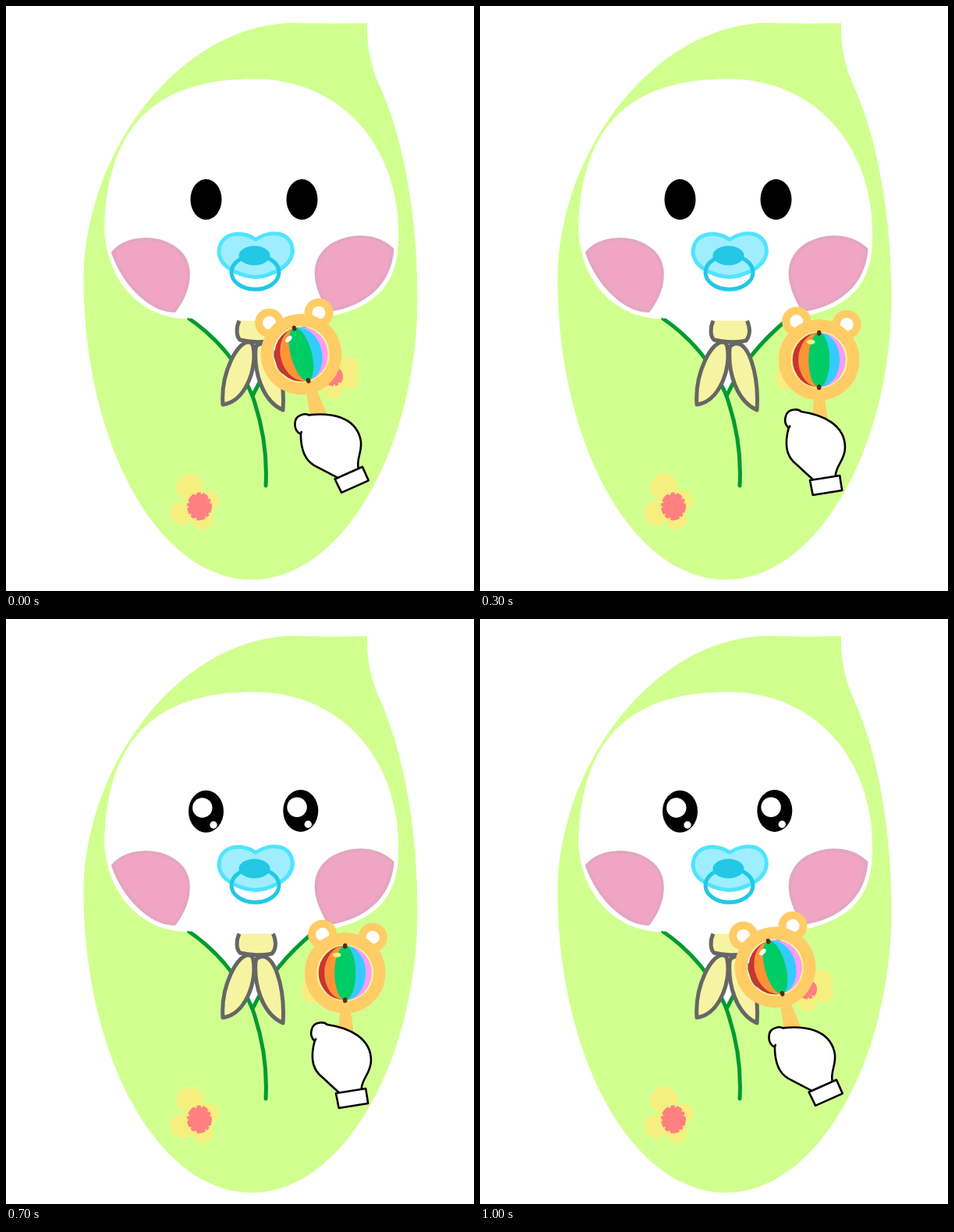
Write an HTML page that moves like this. It is 600 px wide and 750 px high and loops after 1450 ms.

```html
<!DOCTYPE html>
<html lang="en">
<head>
<meta charset="utf-8">
<title>Baby with a rattle</title>
<style>
html, body { margin: 0; width: 100%; height: 100%; overflow: hidden; background: #fff; }
svg { display: block; width: 100%; height: 100%; }
.scarf { fill: #f6f4a2; stroke: #666; stroke-width: 5; stroke-linejoin: round; }
.cheek { fill: #f0a5c4; stroke: #e3a6c0; stroke-width: 4; stroke-linejoin: round; }
.seam { fill: none; stroke: #009a33; stroke-width: 5; stroke-linecap: round; }
.hand { fill: #fff; stroke: #000; stroke-width: 2.6; stroke-linejoin: round; stroke-linecap: round; }
.petals { fill: #f4ef7e; }
.heart { fill: #ff8080; stroke: #ff8080; stroke-width: 4; stroke-dasharray: 8 2 4 2 11 3 5 2; }
.ear { fill: #fff; stroke: #fc6; stroke-width: 10; }
</style>
</head>
<body>
<svg viewBox="0 0 600 750">
  <path fill="#d1ff8f" d="M372 21.500Q400 23 463 22C462 50 468 78 478 100C510 170 527.500 270 527.500 375C527.500 560 435 735.500 315 735.500C195 735.500 99.500 560 99.500 350C99.500 190 222 21.500 372 21.500Z"/>

  <g class="petals">
    <circle cx="236" cy="617" r="17.5"/><circle cx="261" cy="634" r="12.5"/>
    <circle cx="226" cy="650" r="15.5"/><circle cx="252" cy="658" r="13.5"/>
    <circle cx="412" cy="448" r="16"/><circle cx="439" cy="463" r="13.5"/>
    <circle cx="441" cy="479" r="12"/><circle cx="393" cy="477" r="15"/>
    <circle cx="419" cy="490" r="13.5"/>
  </g>
  <ellipse class="heart" cx="248" cy="641.500" rx="14" ry="16"/>
  <ellipse class="heart" cx="420" cy="475" rx="10" ry="10.500"/>

  <path fill="#fff" d="M126 285C130 160 185 93.500 318 93.500C430 93.500 503 180 503 290C505 357 475 391 395 401C360 430 335 460 316 500C300 460 270 425 235 401C178 402 129 358 126 285Z"/>
  <path class="seam" d="M235 401C270 425 300 460 316 500C330 540 335 580 333 615M395 401C360 430 335 460 316 500"/>
  <path fill="#fff" d="M225 385H408L396 400.500H234Z"/>

  <path class="scarf" d="M311 431C297 430 275 470 278 511C307 507 322 465 317 437Q316 431 311 431Z"/>
  <path class="scarf" d="M324 434C344 424 358 474 355 518C328 506 318 468 320 440Q320 435 324 434Z"/>
  <path class="scarf" d="M299 403.500C295 412 295 423 300 428C312 431 330 432 341 429C347 422 346 412 342.500 403.500"/>

  <path class="cheek" d="M137 316C155 295 195 293 220 313C240 330 238 362 216 391C188 391 153 361 137 316Z"/>
  <path class="cheek" d="M495.500 312C475 293 445 292 420 305C393 322 390 350 414 390C457 384 492 358 495.500 312Z"/>

  <g id="plainEyes">
    <ellipse cx="256.500" cy="248" rx="20" ry="26"/>
    <ellipse cx="379.500" cy="248" rx="20" ry="26"/>
  </g>
  <g id="brightEyes">
    <g id="brightEye">
      <ellipse cx="256.500" cy="246.700" rx="22.500" ry="27"/>
      <circle cx="251.800" cy="242" r="12.700" fill="#fff"/>
      <circle cx="266" cy="264" r="4.700" fill="#fff"/>
    </g>
    <use href="#brightEye" x="121.300" y="-.8"/>
  </g>

  <path fill="#9eeeff" stroke="#4fe4ff" stroke-width="5" stroke-linejoin="round" d="M320 299.500C303 287 274 290 273 315C274 340 310 347 320 347.500C332 347 366 338 367.500 314C366 288 338 287 320 299.500Z"/>
  <ellipse cx="319.500" cy="341.500" rx="30.500" ry="21.700" fill="none" stroke="#22c8e5" stroke-width="5"/>
  <ellipse cx="318.500" cy="320" rx="20" ry="12.500" fill="#22c8e5"/>

  <!-- Origin: centre of the ring -->
  <g id="rattle">
    <path fill="#fc6" d="M-6 46H7L12 84H-10Z"/>
    <circle class="ear" cx="-29" cy="-49.500" r="13.500"/>
    <circle class="ear" cx="35.500" cy="-45.500" r="13.500"/>
    <circle r="36" fill="none" stroke="#fff6b0" stroke-width="1.500"/>
    <circle r="44" fill="none" stroke="#fc6" stroke-width="15.500"/>
    <path fill="#c93434" d="M0-35A34 35 0 0 0 0 35Z"/>
    <path fill="#f9f" d="M0-35A34 35 0 0 1 0 35Z"/>
    <path fill="#ff9436" d="M0-35A26.500 35 0 0 0 0 35Z"/>
    <path fill="#3cf" d="M0-35A26.500 35 0 0 1 0 35Z"/>
    <ellipse rx="13.500" ry="35" fill="#0c6"/>
    <ellipse cy="-34.500" rx="2.800" ry="3.500" fill="#5a2d0c"/>
    <ellipse cy="35" rx="2.800" ry="3.500" fill="#5a2d0c"/>
    <ellipse id="shine" rx="5.300" ry="3"/>
  </g>

  <!-- Origin: centre of the cuff -->
  <g id="hand" class="hand">
    <path d="M-17-7.500L-42-30.500C-53-41.500-52-58.500-48-73.500C-56-80.500-53-96.500-41-97C-36-97.500-34-96.500-32-94.500C-4-90.500 24.300-77.500 24.300-48.500C24.300-32.500 13-26.500 12-12.500"/>
    <path d="M-48-73.500L-46.500-76"/>
    <path d="M-20.700-6.500L17.500-12.500L20.500 6.500L-17 12.500Z"/>
  </g>
</svg>
<script>
const LOOP = 1450;
const byId = id => document.getElementById(id);

// Each pose holds x, y and angle
const handLeft = [443.3, 607.4, -15];
const left = { rattle: [378.5, 446.5, -15], hand: handLeft, glint: true };
const leftNear = { rattle: [386.5, 449.5, -15], hand: handLeft };
const middle = { rattle: [434.7, 453.7, 0], hand: [443.7, 614.5, 0] };
const right = { rattle: [468.7, 443, 20], hand: [429.5, 599.7, 14.5] };

// Start time, pose, bright eyes
const steps = [
  [0, left, false],
  [250, leftNear, false],
  [300, middle, false],
  [500, right, false],
  [550, right, true],
  [700, middle, true],
  [950, leftNear, true],
  [1000, left, true]
];

const place = (id, [x, y, angle]) =>
  byId(id).setAttribute("transform", `translate(${x} ${y}) rotate(${angle})`);
const show = (id, visible) => byId(id).style.display = visible ? "" : "none";

let current;
function draw(now) {
  const time = now % LOOP;
  const step = steps.findLast(([start]) => start <= time);
  if (step !== current) {
    current = step;
    const [, pose, bright] = step;
    place("rattle", pose.rattle);
    place("hand", pose.hand);
    place("shine", [-10.5, -23, pose.glint ? -30 : 0]);
    byId("shine").setAttribute("fill", pose.glint ? "#fff" : "#f5f080");
    show("plainEyes", !bright);
    show("brightEyes", bright);
  }
}

const began = performance.now();
function tick() {
  draw(performance.now() - began);
  requestAnimationFrame(tick);
}
tick();
</script>
</body>
</html>
```
